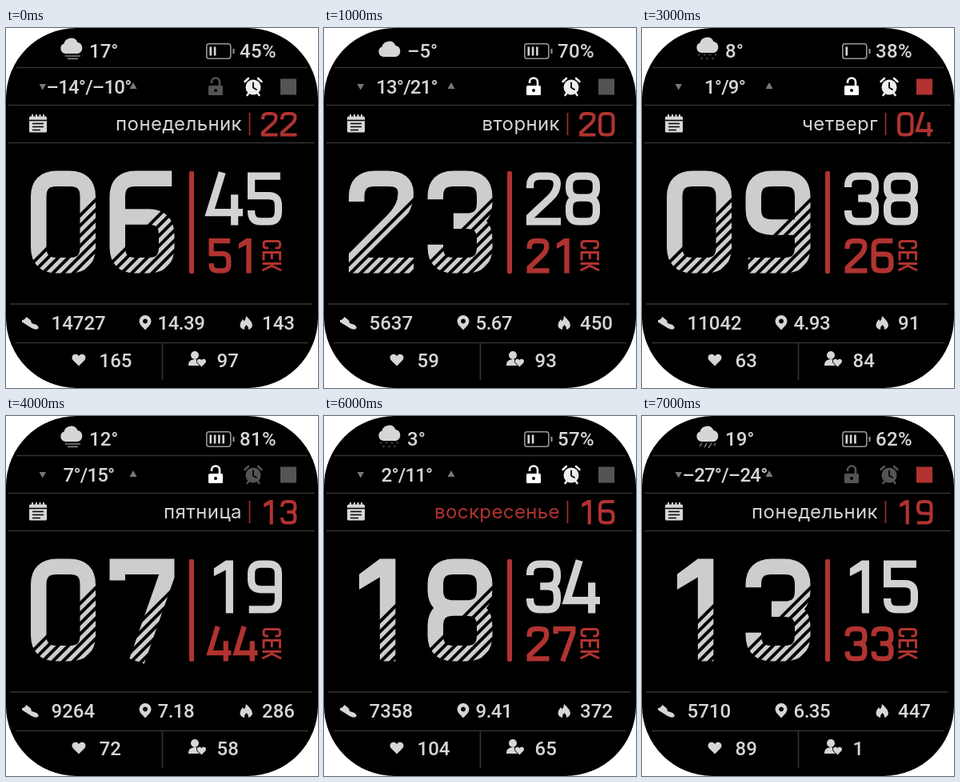
These frames come from a looping animation (390x450 px, 8000 ms). An HTML page:

```html
<!DOCTYPE html>
<html lang="ru">
<head>
<meta charset="utf-8">
<title>Циферблат</title>
<style>
html, body { margin: 0; width: 100%; height: 100%; overflow: hidden; background: #fff; }
svg { display: block; width: 390px; height: 450px; }
text { font: 500 24px Roboto, sans-serif; fill: #d6d6d6; }
#day { font: 400 24px Inter, sans-serif; text-anchor: end; letter-spacing: .4px; }
#range { text-anchor: middle; letter-spacing: -.8px; }
#dist { letter-spacing: -.5px; }
#charge { letter-spacing: .4px; }
</style>
</head>
<body>
<svg viewBox="0 0 390 450">
  <defs>
    <pattern id="hatch" width="9" height="9" patternUnits="userSpaceOnUse" patternTransform="rotate(45)">
      <rect x="4" width="5" height="9" fill="#fff"/>
    </pattern>
    <mask id="cut" maskUnits="userSpaceOnUse" x="-10" y="-10" width="110" height="150">
      <path d="M-10-10H124.500L-10 124.500Z" fill="#fff"/>
      <path d="M124.500-10L-10 124.500V150H124.500Z" fill="url(#hatch)"/>
    </mask>
    <path id="cloud" d="M74 36a6.5 6.5 0 0 1-1.500-12.500a9 9 0 0 1 17-1.500a7.200 7.200 0 0 1 .5 14z"/>
    <path id="heart" d="M9 15L1.500 7.500C-2 2 5-2.500 9 2.500C13-2.500 20 2 16.500 7.500Z"/>
  </defs>

  <rect width="390" height="450" rx="88"/>
  <path d="M13 49.500H377M3 96.500H386M3 143.500H386M5 345H383M12 393.500H378M195.500 394V440" stroke="#333" stroke-width="1.600"/>

  <g id="weather"></g>
  <text id="temp" x="104" y="37"></text>
  <g id="battery"></g>
  <text id="charge" x="292" y="37"></text>

  <path d="M41.500 70H50L45.700 77.500ZM154.500 76H163.500L159 68Z" fill="#777"/>
  <text id="range" x="103.500" y="82"></text>
  <g id="lock">
    <rect x="253" y="72" width="18" height="12" rx="1.500" fill="currentColor"/>
    <path d="M257 69V67.500a5 5 0 0 1 10 0V73" fill="none" stroke="currentColor" stroke-width="2.600"/>
    <circle cx="262" cy="78" r="2"/>
  </g>
  <g id="alarm" fill="none" stroke="currentColor" stroke-width="2.600" stroke-linecap="round">
    <circle cx="309" cy="74" r="9.500" fill="currentColor" stroke="none"/>
    <path d="M298.500 67L303 63M319.500 67L315 63M303 82L301.500 84M315 82L316.500 84"/>
    <path d="M309 68.500V74.500L313 77" stroke="#000" stroke-width="1.800"/>
  </g>
  <rect id="link" x="343" y="63.500" width="20" height="20"/>

  <g fill="#d6d6d6">
    <rect x="29" y="110.500" width="22" height="20" rx="1.500"/>
    <path d="M33 108V113M38 108V113M42.500 108V113M47 108V113" stroke="#d6d6d6" stroke-width="2"/>
    <path d="M29 115.500H51M33 119.500H47M33 123.500H47M33 127.500H43" stroke="#000" stroke-width="1.500"/>
  </g>
  <text id="day" x="295" y="128"></text>
  <path d="M304.500 106V134" stroke="#a5302d" stroke-width="1.600"/>
  <rect x="229" y="179" width="6" height="128" rx="2" fill="#b03330"/>

  <g id="digits" fill="none"></g>

  <g fill="#d6d6d6">
    <path d="M20 365Q23 365.500 25.500 361L31 365.500L32 369L38 371Q42 374 40 376Q37 378 32 375L20 367.500Z"/>
    <path d="M174 377.500L168 371A7.500 7.500 0 1 1 180 371ZM174 363.500a3 3 0 1 0 .1 0Z"/>
    <path d="M300 360Q308 367 308 372Q307 376 303 377Q303 373 300.500 371Q298 373 298 377Q293 376 292.500 372Q293 367 296 364L297.500 366.500Q300 364 300 360Z"/>
    <use href="#heart" x="82" y="407.500"/>
    <circle cx="236" cy="409" r="5"/>
    <path d="M228 421Q228 414.500 236 414Q240 414 241 417L245 422H228Z"/>
    <use href="#heart" transform="translate(238.500 413.500) scale(.66)" stroke="#000" stroke-width="2.500" paint-order="stroke"/>
  </g>
  <text id="steps" x="56.500" y="377"></text>
  <text id="dist" x="189.500" y="377"></text>
  <text id="kcal" x="320" y="377"></text>
  <text id="pulse" x="116.500" y="424"></text>
  <text id="score" x="263.500" y="424"></text>
</svg>
<script>
const RED = '#b03330', LIGHT = '#d6d6d6', DIM = '#545454';
const STEP = 1000;
const $ = id => document.getElementById(id);

// weather, temp, charge, range, lock, alarm, link, weekday, date, h, m, s, steps, dist, kcal, pulse, score
const states = [
  ['fog', '17°', 45, '–14°/–10°', 0, 1, 0, 'понедельник', '22', '06', '45', '51', 14727, '14.39', 143, 165, 97],
  ['cloud', '–5°', 70, '13°/21°', 1, 1, 0, 'вторник', '20', '23', '28', '21', 5637, '5.67', 450, 59, 93],
  ['snow', '–', 63, '—', 0, 1, 0, 'среда', '06', '12', '27', '52', 1566, '12.30', 449, 49, 96],
  ['sleet', '8°', 38, '1°/9°', 1, 1, 1, 'четверг', '04', '09', '38', '26', 11042, '4.93', 91, 63, 84],
  ['fog', '12°', 81, '7°/15°', 1, 0, 0, 'пятница', '13', '07', '19', '44', 9264, '7.18', 286, 72, 58],
  ['rain', '–19°', 4, '–20°/–12°', 0, 0, 0, 'суббота', '22', '00', '56', '16', 8119, '8.82', 305, 139, 33],
  ['sleet', '3°', 57, '2°/11°', 1, 1, 0, 'воскресенье', '16', '18', '34', '27', 7358, '9.41', 372, 104, 65],
  ['rain', '19°', 62, '–27°/–24°', 0, 0, 1, 'понедельник', '19', '13', '15', '33', 5710, '6.35', 447, 89, 1]
];

// Polyline; points with a third value get a rounded corner.
function bend(pts, r) {
  const toward = (p, q) => {
    const d = Math.hypot(q[0] - p[0], q[1] - p[1]);
    const k = Math.min(r, d * (q[2] ? .5 : 1)) / d;
    return [p[0] + (q[0] - p[0]) * k, p[1] + (q[1] - p[1]) * k];
  };
  return pts.map((p, i) => {
    if (!i) return 'M' + p.slice(0, 2);
    if (!p[2]) return 'L' + p.slice(0, 2);
    return `L${toward(p, pts[i - 1])}Q${p[0]},${p[1]} ${toward(p, pts[i + 1])}`;
  }).join('');
}

function outline(ch, w, h, s) {
  const L = s / 2, R = w - L, T = L, B = h - L, m = w / 2;
  const ring = (a, b) => [[m, a], [R, a, 1], [R, b, 1], [L, b, 1], [L, a, 1], [m + 1, a]];
  const shapes = {
    0: [ring(T, B)],
    2: [[[L, h * .3], [L, T, 1], [R, T, 1], [R, h * .36, 1], [L, h * .84], [L, B], [w, B]]],
    3: [[[L, h * .28], [L, T, 1], [R, T, 1], [R, h * .49, 1], [w * .4, h * .49]],
        [[m, h * .49], [R, h * .49, 1], [R, B, 1], [L, B, 1], [L, h * .72]]],
    4: [[[w * .4, 0], [w * .04, h * .76], [w, h * .76]], [[w * .76, h * .42], [w * .76, h]]],
    5: [[[w * .95, T], [L, T], [L, h * .44], [R, h * .44, 1], [R, B, 1], [L, B, 1], [L, h * .72]]],
    6: [[[w * .96, T], [L, T, 1], [L, B, 1], [R, B, 1], [R, h * .45, 1], [L, h * .45]]],
    7: [[[L, h * .21], [L, T], [R, T], [R, h * .17], [w * .42, h]]],
    8: [ring(T, h * .48), ring(h * .48, B)],
    9: [[[w * .04, B], [R, B, 1], [R, T, 1], [L, T, 1], [L, h * .55, 1], [R, h * .55]]],
    'С': [[[R, h * .32], [R, T, 1], [L, T, 1], [L, B, 1], [R, B, 1], [R, h * .68]]],
    'Е': [[[w, T], [L, T], [L, B], [w, B]], [[L, h / 2], [w * .88, h / 2]]],
    'К': [[[L, 0], [L, h]], [[R, 0], [w * .36, h / 2], [R, h]]]
  };
  return shapes[ch].map(p => bend(p, w * .28)).join('');
}

function glyph(ch, w, h, s, color) {
  if (ch === '1') {
    const a = w * .16, b = w * .72;
    return `<path fill="${color}" d="M${b} 0V${h}H${b - s}V${h * .18}L${a} ${h * .3}V${h * .15}L${b - s} 0Z"/>`;
  }
  return `<path stroke="${color}" stroke-width="${s}" d="${outline(ch, w, h, s)}"/>`;
}

function word(str, x, y, w, h, s, gap, color, mask = '', turn = 0) {
  const body = [...str].map((ch, i) =>
    `<g transform="translate(${i * gap} 0)"><g ${mask}>${glyph(ch, w, h, s, color)}</g></g>`).join('');
  return `<g role="img" aria-label="${str}" transform="translate(${x} ${y}) rotate(${turn})">${body}</g>`;
}

function weather(kind) {
  const lift = { cloud: 0, fog: -4, rain: -4, snow: -7, sleet: -5 }[kind];
  let extra = '';
  if (kind === 'fog') extra = '<path d="M74 35H93M77 38.500H90" stroke="#bbb" stroke-width="1.200"/>';
  if (kind === 'rain') extra = '<path d="M75 34L72 38M81 34L78 39M87 34L83 40M92 34L90 37" stroke="#999" stroke-width="1.200"/>';
  if (kind === 'snow' || kind === 'sleet') {
    const r = kind === 'snow' ? 2 : 1.4;
    for (let i = 0; i < 7; i++) {
      extra += `<circle cx="${i < 4 ? 71 + i * 7 : 46.5 + i * 7}" cy="${i < 4 ? 33.5 : 38}" r="${r}" fill="#383838"/>`;
    }
  }
  return `<use href="#cloud" y="${lift}" fill="${LIGHT}"/>${extra}`;
}

function battery(p) {
  const color = p < 20 ? RED : LIGHT;
  let out = '<rect x="250.800" y="19.800" width="30" height="18.400" rx="3" fill="none" stroke="#999" stroke-width="1.600"/>' +
    '<path d="M284.500 26V32" stroke="#999" stroke-width="2"/>';
  for (let i = 0; i < Math.max(1, Math.floor(p / 20)); i++) {
    out += `<rect x="${254.5 + i * 5.3}" y="23.500" width="2.600" height="11" fill="${color}"/>`;
  }
  return out;
}

function show(state) {
  const [sky, temp, charge, range, lock, alarm, link, day, date, hh, mm, ss, steps, dist, kcal, pulse, score] = state;
  const labels = { temp, charge: charge + '%', range, day, steps, dist, kcal, pulse, score };
  for (const id in labels) $(id).textContent = labels[id];
  $('weather').innerHTML = weather(sky);
  $('battery').innerHTML = battery(charge);
  $('lock').style.color = lock ? '#fff' : DIM;
  $('alarm').style.color = alarm ? '#eee' : DIM;
  $('link').style.fill = link ? RED : DIM;
  $('day').style.fill = /^(суб|вос)/.test(day) ? RED : LIGHT;
  $('digits').innerHTML =
    word(hh, 31, 178.5, 81, 128, 19.5, 98.5, '#cdcdcd', 'mask="url(#cut)"') +
    word(mm, 253, 180.5, 43, 66, 9.2, 49, '#d2d2d2') +
    word(ss, 253.5, 263, 28, 43.5, 6.3, 33, RED) +
    word(date, 319, 105, 20.5, 30.5, 4.1, 24, RED) +
    word('СЕК', 344, 265, 11.5, 23.5, 3, 14, RED, '', 90);
}

let shown = -1;
const start = performance.now();
function tick() {
  const i = Math.floor((performance.now() - start) / STEP) % states.length;
  if (i !== shown) show(states[shown = i]);
  requestAnimationFrame(tick);
}
tick();
</script>
</body>
</html>
```
